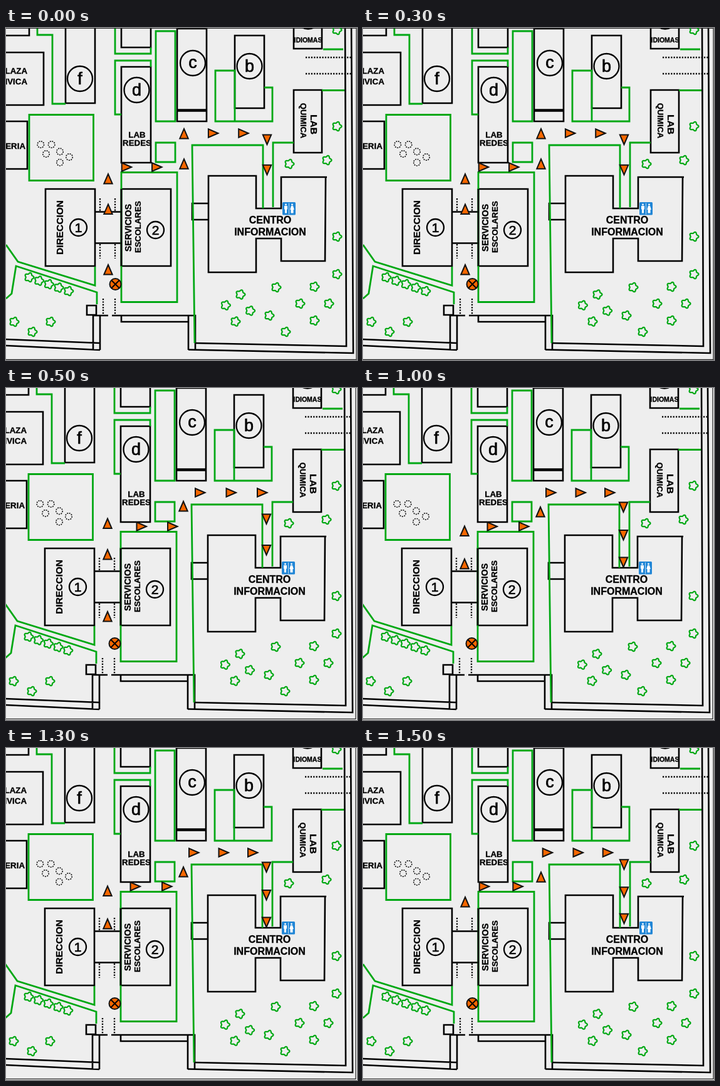
These frames come from a looping animation (560 by 530 pixels, 2 s). An HTML page:

```html
<!DOCTYPE html>
<html lang="es">
<head>
<meta charset="utf-8">
<title>Plano</title>
<style>
html, body { margin: 0; width: 100%; height: 100%; overflow: hidden; background: #fff; }
svg { display: block; width: 560px; height: 530px; }
text { font: bold 13.3px "Liberation Sans", Arial, sans-serif; fill: #000; stroke: #000; stroke-width: .3; text-anchor: middle; }
.sign text { font: 27px "Liberation Sans", Arial, sans-serif; stroke-width: .7; }
.sign .small { font-size: 21px; }
.sign circle { fill: none; stroke: #000; stroke-width: 2.3; }
.end { text-anchor: end; }
.green { fill: none; stroke: #00a814; stroke-width: 2.8; }
.black { fill: none; stroke: #000; stroke-width: 2.6; }
.thick { stroke-width: 4.5; }
.dots { stroke-width: 2.3; stroke-dasharray: 2.2; }
.tree { fill: none; stroke: #00a814; stroke-width: 2.2; stroke-linejoin: round; }
.bush { fill: none; stroke: #222; stroke-width: 1.7; stroke-dasharray: 2 1.5; }
.mark { fill: #f76700; stroke: #111; stroke-width: 2; }
#map { animation: shake 2s step-end infinite; }
#arrows g { visibility: hidden; animation: show 2s step-end infinite; }
@keyframes shake {
  0% { transform: translate(0, 0); }
  25% { transform: translate(-1px, -1px); }
  75% { transform: translate(0, -1px); }
}
@keyframes show {
  0% { visibility: visible; }
  25%, 100% { visibility: hidden; }
}
</style>
</head>
<body>
<svg viewBox="0 0 560 530">
  <defs><clipPath id="sheet"><path d="M0 0H560V530H0z"/></clipPath></defs>
  <g id="map">
    <g clip-path="url(#sheet)">
      <path fill="#eee" d="M0 0H560V530H0z"/>
      <path class="black" d="M0 12H37V0M-9 39H60V123H-9M95 -2V120H142V-2M-9 149H34V225H-9
        M184 -2V31H231V-2M184 62H231V215H184zM273 1H320V149H273zM365 12H412V128H365z
        M459 -2V33H504V-2M459 99H504V199H459z
        M63 257H142V380H63zM184 257H263V380H184zM142 293.5H184M142 343.5H184
        M512 238H439V288H399V236H323V390H399V336H439V372H509L510 238M297 280H323V306H297z
        M129 443H144V458H129zM139 459H163M169 459H302V515M184 459V469H291M291 459V514
        M139 459V514M150 459V514M0 497L150 503M0 507L150 514"/>
      <path class="black thick" d="M273 131.5H320"/>
      <path class="green" d="M50 0V11H74V121H95M174 0V41H231V31M231 62V52H174V138H184
        M239 5H270V149H239zM239 183H270V214H239zM365 149V68H334V149H425V95H412
        M37 138.5H139.5V243.5H37zM184 257V230.5H273V437.5H184V257
        M301 503L297 187H410V288M459 183H426V286
        M0 346L19 373L142 411V381M0 432L9 424L16 380L145 422V441M506 34H538M504 99.5H540"/>
      <path class="black" d="M184 257V380M302 503L543 508L541 0M291 513.5L554 519L551 0"/>
      <path class="black dots" d="M478 47H551M478 73H551M155 432V459M174 432V459
        M150 345V368M174 345V368M150 272V292M174 272V292"/>
      <path stroke="#222" stroke-width="1.2" fill="none" d="M0 .4H559V529.4H0"/>

      <g id="plants"></g>

      <g class="sign">
        <circle cx="118" cy="81" r="20"/><text x="118" y="90">f</text>
        <circle cx="208.5" cy="99" r="20"/><text x="208.5" y="108">d</text>
        <circle cx="298" cy="56" r="20"/><text x="298" y="64">c</text>
        <circle cx="388.5" cy="61" r="20"/><text x="388.5" y="70">b</text>
        <circle cx="482" cy="-18.5" r="20"/>
        <circle cx="115.5" cy="318.5" r="13.5"/><text class="small" x="115.5" y="326">1</text>
        <circle cx="238.5" cy="322.5" r="13.5"/><text class="small" x="238.5" y="330">2</text>
      </g>

      <text class="end" x="34" y="73">PLAZA</text>
      <text class="end" x="34" y="90">CIVICA</text>
      <text class="end" x="31" y="193">CAFETERIA</text>
      <text x="209" y="174.5">LAB</text>
      <text x="209" y="188">REDES</text>
      <text x="482" y="23" style="font-size:10.5px">IDIOMAS</text>
      <text transform="translate(485.5 154) rotate(90)" style="font-size:15.5px">LAB</text>
      <text transform="translate(469.5 148) rotate(90)" style="font-size:13px">QUIMICA</text>
      <text transform="translate(91 318.5) rotate(-90)" style="font-size:15.5px">DIRECCION</text>
      <text transform="translate(200 319) rotate(-90)" style="font-size:14px">SERVICIOS</text>
      <text transform="translate(215 317.5) rotate(-90)">ESCOLARES</text>
      <text x="421.5" y="312" style="font-size:16px">CENTRO</text>
      <text x="421.5" y="331" style="font-size:16px">INFORMACION</text>

      <rect x="441" y="278" width="21" height="20.5" rx="1.5" fill="#2186d6"/>
      <g fill="#fff">
        <circle cx="446.5" cy="282" r="1.4"/><circle cx="456.5" cy="282" r="1.4"/>
        <path d="M444 284h5v5.5h-1v6h-3v-6h-1zM455 284h3l1.8 6h-1.3v5.5h-4v-5.5h-1.3zM451.2 279.5h.7v18h-.7z"/>
      </g>

      <circle class="mark" cx="174.5" cy="409" r="9"/>
      <path class="black" style="stroke-width:2" d="M168.5 403l12 12M180.5 403l-12 12"/>
      <g id="arrows"></g>
    </g>
  </g>
</svg>
<script>
const $ = id => document.getElementById(id);

function add(parent, tag, attrs) {
  const el = document.createElementNS("http://www.w3.org/2000/svg", tag);
  for (const k in attrs) el.setAttribute(k, attrs[k]);
  return parent.appendChild(el);
}

const row = (n, x, y, dx, dy) =>
  Array.from({ length: n }, (_, i) => [x + i * dx, y + i * dy]);

const ring = (n, x, y, rx, ry, turn) =>
  Array.from({ length: n }, (_, i) => {
    const a = turn + i * 2 * Math.PI / n;
    return [x + rx * Math.cos(a), y + ry * Math.sin(a)];
  });

// Tree crown: a circle with a wavy radius
const crown = "M" + Array.from({ length: 60 }, (_, i) => {
  const a = i * Math.PI / 30, r = 6.4 + 1.1 * Math.cos(5 * a);
  return (r * Math.cos(a)).toFixed(2) + " " + (r * Math.sin(a)).toFixed(2);
}).join("L") + "z";

const trees = [
  ...row(5, 37, 398, 15.7, 5.5),
  ...row(2, 13, 469, 58, 0),
  ...row(2, 42, 485, 404, 0),
  ...ring(4, 370, 447, 20, 22, .2),
  ...ring(4, 492, 440, 23, 27, 0),
  ...row(2, 420, 459, 11, -45),
  ...row(2, 528, 393, 0, -60),
  ...row(2, 528, 157, 0, -154),
  ...row(2, 512, 211, -60, 6)
];
for (const [x, y] of trees)
  add($("plants"), "path", { class: "tree", d: crown, transform: `translate(${x} ${y})` });

const bushes = [...ring(3, 64, 191, 10, 10, Math.PI / 2), ...ring(3, 91, 206, 10, 10, 0)];
for (const [cx, cy] of bushes)
  add($("plants"), "circle", { class: "bush", cx, cy, r: 5.2 });

// Route from the marker to the information centre
const legs = [
  { x: 163, y: 409, angle: 0, len: 192 },
  { x: 168, y: 222, angle: 90, len: 116 },
  { x: 284, y: 222, angle: 0, len: 59 },
  { x: 288, y: 168, angle: 90, len: 128 },
  { x: 416.5, y: 167, angle: 180, len: Infinity }
];
const underBridge = s => s > 63 && s < 118;

function place(s) {
  for (const { x, y, angle, len } of legs) {
    if (s <= len) return `translate(${x} ${y}) rotate(${angle}) translate(0 ${-s})`;
    s -= len;
  }
}

// Each step lays arrows along the route; bend tightens the gaps towards the end
const steps = [
  { start: 23, gap: 48.3, bend: 0, count: 12 },
  { start: 43, gap: 49.5, bend: 0, count: 12 },
  { start: 127, gap: 53, bend: .5, count: 11 },
  { start: 162, gap: 56, bend: .8, count: 10 }
];
steps.forEach(({ start, gap, bend, count }, n) => {
  const g = add($("arrows"), "g", { style: `animation-delay:${n ? n * 500 - 2000 : 0}ms` });
  for (let i = 0; i < count; i++) {
    const s = start + gap * i - bend * i * i;
    if (!underBridge(s))
      add(g, "path", { class: "mark", d: "M0 -8L6.7 7.5H-6.7z", transform: place(s) });
  }
});
</script>
</body>
</html>
```
